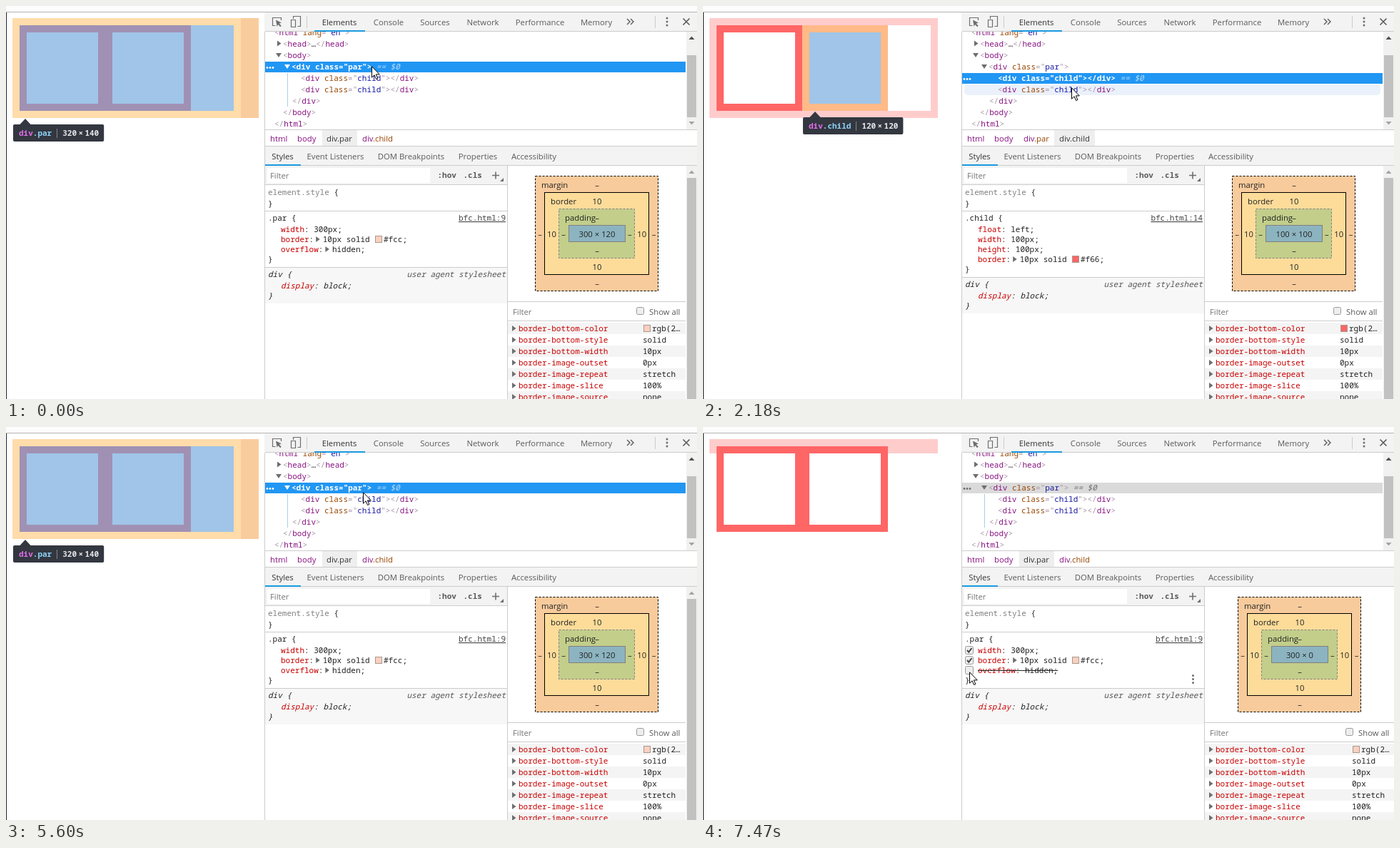
An HTML page that plays this animation: 968x551 px, repeating every 8.96 s.

```html
<!DOCTYPE html>
<html lang="en">
<head>
<meta charset="utf-8">
<title>Inspecting a block formatting context</title>
<style>
  html, body { margin: 0; width: 100%; height: 100%; overflow: hidden; background: #fff; }
  svg { display: block; width: 968px; height: 551px; }
  text { white-space: pre; font: 11.3px "Open Sans", "Noto Sans", sans-serif; }
  .mono { font: 11px "Noto Sans Mono", "DejaVu Sans Mono", monospace; }
  .bold { font-weight: 700; }
  .italic { font-style: italic; }
  .mid { text-anchor: middle; }
  .end { text-anchor: end; }
</style>
</head>
<body>
<svg id="stage" viewBox="0 0 968 551"></svg>
<script>
const LOOP = 8960, CHAR = 6.6;
const TAG = '#881280', ATTR = '#994500', VALUE = '#1a1aa6', PUNCT = '#a894a6';
const PROP = '#c80000', INK = '#222', GRAY = '#6e6e6e', LINE = '#ccc', BAR = '#f3f3f3', BLUE = '#2196f3';
const CONTENT = 'rgba(111,168,220,.66)', BORDER = 'rgba(255,229,153,.66)', MARGIN = 'rgba(246,178,107,.66)';

// Pointer moves: start, end, number of steps, destination.
const START = [512, 84];
const MOVES = [
  [1000, 1110, 3, 517, 97], [1250, 1250, 1, 517, 98], [1990, 2180, 4, 516, 114],
  [4300, 4480, 4, 506, 98], [4550, 4550, 1, 500, 91], [5650, 5910, 5, 436, 284],
  [6050, 6580, 9, 376, 345], [6720, 6790, 2, 373, 343]
];
const CLICKS = [[560, 680], [1810, 1930], [3170, 3310], [5090, 5220], [7280, 7470]];
const SELECTED = [[0, 0], [1860, 1], [3240, 2], [5150, 0]];
const UNCHECK = 7350;

// ---- drawing helpers
const esc = s => s.replace(/&/g, '&amp;').replace(/</g, '&lt;');
const rect = (x, y, w, h, fill, more = '') =>
  `<rect x="${x}" y="${y}" width="${w}" height="${h}" fill="${fill}" ${more}/>`;
const outline = (x, y, w, h, fill, stroke, more = '') =>
  rect(x + .5, y + .5, w - 1, h - 1, fill, `stroke="${stroke}" ${more}`);
const path = (d, fill, stroke = 'none', width = 1) =>
  `<path d="${d}" fill="${fill}" stroke="${stroke}" stroke-width="${width}"/>`;
const text = (x, y, s, fill = INK, cls = '') =>
  `<text x="${x}" y="${y}" fill="${fill}" class="${cls}">${esc(s)}</text>`;
const spans = (x, y, parts, cls = 'mono') => `<text x="${x}" y="${y}" class="${cls}">` +
  parts.map(([s, fill]) => `<tspan fill="${fill}">${esc(s)}</tspan>`).join('') + '</text>';
const mono = (x, y, s, fill = INK, cls = '') => text(x, y, s, fill, 'mono ' + cls);
const right = (x, y, fill = GRAY) => path(`M${x} ${y - 4}v8l5.5 -4z`, fill);
const down = (x, y, fill = GRAY) => path(`M${x} ${y - 3}h8l-4 6z`, fill);
const dots = (x, y, dx, dy, r, fill) =>
  [-1, 0, 1].map(i => `<circle cx="${x + i * dx}" cy="${y + i * dy}" r="${r}" fill="${fill}"/>`).join('');
const swatch = (x, y, fill) => outline(x, y, 10, 10, fill, '#a9988f');
const checkbox = (x, y, on) => outline(x, y, 12, 12, '#eee', '#999', 'rx="2"') +
  (on ? path(`M${x + 3} ${y + 6}l2.3 2.6l4.2 -5.6`, 'none', '#444', 2) : '');
const hline = (x, y, w) => rect(x, y, w, 1, LINE);

// ---- state
function pointer(t) {
  let [x, y] = START;
  for (const [from, to, steps, endX, endY] of MOVES) {
    if (t < from) break;
    const k = t >= to ? 1 : (1 + Math.floor((t - from) / (to - from) * (steps - 1))) / steps;
    x += (endX - x) * k;
    y += (endY - y) * k;
  }
  return [x, y];
}

function stateAt(t) {
  const [x, y] = pointer(t);
  return {
    x, y,
    row: y >= 78 && y < 174 ? Math.floor((y - 78) / 16) : -1,
    selected: SELECTED.filter(s => s[0] <= t).pop()[1],
    click: CLICKS.some(([a, b]) => t >= a && t < b),
    ruleHover: y >= 284,
    off: t >= UNCHECK
  };
}

// ---- inspected page
function tooltip(x, y, tag, cls, w, h) {
  const sep = x + 15 + CHAR * (tag + cls).length;
  return rect(x, y, sep + 66 - x, 24, '#333740', 'rx="2"') +
    path(`M${x + 9} ${y + .5}l8 -8.5l8 8.5z`, '#333740') +
    spans(x + 8, y + 16, [[tag, '#e36eec'], [cls, '#8ed3fb']], 'mono bold') +
    rect(Math.floor(sep), y + 6, 1, 13, '#80868b') +
    `<text class="mono bold" x="${sep + 8}" y="${y + 16}" fill="#e4e6e8">${w}<tspan dx="2.4">×</tspan><tspan dx="2.4">${h}</tspan></text>`;
}

function frame(x, y, w, h, fill) {
  return path(`M${x} ${y}h${w}v${h}h${-w}zM${x + 10} ${y + 10}v${h - 20}h${w - 20}v${20 - h}z`, fill);
}

function overlay(row) {
  if (row === 0 || row === 3)
    return frame(9, 17, 320, 140, BORDER) + rect(19, 27, 300, 120, CONTENT) +
      rect(329, 17, 25, 140, MARGIN) + tooltip(10, 166, 'div', '.par', 320, 140);
  if (row === 1 || row === 2) {
    const x = 19 + 120 * (row - 1);
    return frame(x, 27, 120, 120, BORDER) + rect(x + 10, 37, 100, 100, CONTENT) +
      tooltip(x + 1, 156, 'div', '.child', 120, 120);
  }
  if (row === 4)
    return path('M1 9h361v156h-361zM9 17v140h345v-140z', MARGIN) + rect(9, 17, 345, 140, CONTENT) +
      tooltip(10, 166, 'body', '', 345, 140);
  if (row === 5)
    return rect(1, 9, 361, 156, CONTENT) + tooltip(2, 174, 'html', '', 361, 156);
  return '';
}

function page(s) {
  const h = s.off ? 20 : 140;
  return rect(0, 0, 968, 8, '#fdfdfd') + rect(0, 8, 968, 1, '#b4b4b4') + rect(0, 9, 1, 542, '#20242c') +
    (s.off ? rect(9, 17, 320, h, '#fcc') : frame(9, 17, 320, h, '#fcc')) +
    [19, 139].map(x => rect(x + 10, 37, 100, 100, '#fff') + frame(x, 27, 120, 120, '#f66')).join('') +
    overlay(s.row);
}

// ---- top toolbar
function toolbar() {
  const tabs = [['Elements', 467], ['Console', 536], ['Sources', 601], ['Network', 668], ['Performance', 748], ['Memory', 827]];
  return rect(362, 9, 606, 27, BAR) + hline(363, 35, 605) +
    path('M385.5 20v-3.5h-12v11h4', 'none', GRAY, 1.2) + path('M378 19.5l8 4l-3.3 1.1l3 3.2l-1.5 1.4l-3 -3.2l-1.5 2.8z', GRAY) +
    path('M402.5 18v-3.5h10v14h-4M399.5 19.5h6v10h-6z', 'none', GRAY, 1.2) +
    rect(421, 14, 1, 17, LINE) + rect(909, 14, 1, 17, LINE) +
    tabs.map(([name, x], i) => text(x, 27, name, i ? '#5a5a5a' : '#333', 'mid')).join('') +
    rect(432, 34, 71, 2, '#1a9ae0') +
    path('M870 18l4 4l-4 4M875 18l4 4l-4 4', 'none', '#5a5a5a', 1.4) +
    dots(926, 22, 0, 5, 1.5, GRAY) + path('M948.5 17.5l9 9M957.5 17.5l-9 9', 'none', '#5a5a5a', 1.6);
}

// ---- element tree
const close = name => [['</', PUNCT], [name, TAG], ['>', PUNCT]];
const open = (name, attr, value) => [['<', PUNCT], [name, TAG],
  ...(attr ? [[' ' + attr, ATTR], ['="', PUNCT], [value, VALUE], ['"', PUNCT]] : []), ['>', PUNCT]];

function tree(s) {
  const child = [...open('div', 'class', 'child'), ...close('div')];
  const rows = [
    [376, open('html', 'lang', 'en')], [388, [...open('head'), ['…', INK], ...close('head')]], [388, open('body')],
    [400, open('div', 'class', 'par')], [413, child], [413, child],
    [401, close('div')], [388, close('body')], [376, close('html')]
  ];
  const focus = !s.off, top = 78 + 16 * s.selected;
  let out = rect(363, 36, 605, 137, '#fff');
  if (s.row >= 0 && s.row !== s.selected) out += rect(366, 78 + 16 * s.row, 583, 15, '#ebf1fb', 'rx="5"');
  out += rect(363, top, 589, 15, focus ? BLUE : '#dadada') + dots(370, top + 8.5, 4, 0, 1.4, focus ? '#fff' : GRAY);
  if (s.selected === 0) out += rect(394, 94, 1, 47, '#a9cdea');
  rows.forEach(([x, parts], i) => {
    const y = 41 + 16 * i, picked = i - 3 === s.selected, white = picked && focus;
    out += spans(x, y, white ? parts.map(p => [p[0], '#fff']) : parts, white ? 'mono bold' : 'mono');
    if (picked) {
      const length = parts.reduce((n, p) => n + p[0].length, 0);
      out += mono(x + CHAR * (length + 1), y, '== $0', white ? '#b9dcf9' : GRAY, 'italic');
    }
  });
  out += right(380, 52.5) + down(378, 69) + down(390, 85, s.selected === 0 && focus ? '#fff' : GRAY);
  out += rect(953, 36, 15, 137, '#f1f1f1') + rect(954, 69, 13, 87, '#c1c1c1') +
    path('M956.5 47h8l-4 -4.5z', '#505050') + path('M956.5 162h8l-4 4.5z', '#a3a3a3');
  return `<g clip-path="url(#treeClip)">${out}</g>`;
}

function crumbs(s) {
  const crumb = (x, cls, picked, left, w) => picked
    ? rect(left, 174, w, 22, '#eee') + text(x, 190, 'div' + cls, '#333')
    : spans(x, 190, [['div', TAG], [cls, ATTR]], '');
  return hline(363, 173, 605) + rect(363, 174, 605, 22, '#fff') +
    text(370, 190, 'html', TAG) + text(408, 190, 'body', TAG) +
    crumb(449, '.par', s.selected === 0, 443, 49) + crumb(499, '.child', s.selected > 0, 492, 57);
}

// ---- styles pane
function declaration(y, name, value, expand, color) {
  const x = 385, after = x + CHAR * (name.length + 1);
  if (!expand) return spans(x, y, [[name, PROP], [': ' + value + ';', INK]]);
  const start = after + 12.5;
  let out = spans(x, y, [[name, PROP], [':', INK]]) + right(after + 3, y - 4) + mono(start, y, value + (color ? '' : ';'));
  if (color) out += swatch(517, y - 9, color) + mono(529, y, (color === '#f66' ? '#f66' : '#fcc') + ';');
  return out;
}

function styles(s) {
  const par = s.selected === 0, shift = par ? 0 : 14, end = 366 + shift;
  const tabs = [['Styles', 387.5], ['Event Listeners', 461.5], ['DOM Breakpoints', 567.5], ['Properties', 661], ['Accessibility', 739.5]];
  let out = rect(363, 196, 605, 28, BAR) + hline(363, 196, 605) + hline(363, 223, 605) +
    tabs.map(([name, x], i) => text(x, 215, name, i ? '#5a5a5a' : '#333', 'mid')).join('') +
    rect(363, 222, 50, 2, '#1a9ae0') +
    rect(363, 224, 339, 27, BAR) + rect(366, 227, 228, 21, '#fff') + text(370, 242, 'Filter', '#757575') +
    mono(604.5, 241, ':hov', '#5a5a5a', 'bold') + mono(640.5, 241, '.cls', '#5a5a5a', 'bold') +
    path('M681 237.5h10M686 232.5v10', 'none', GRAY, 1.6) + path('M697 241v5h-5z', GRAY) + hline(363, 250, 339) +
    spans(367, 265, [['element.style', '#808080'], [' {', INK]]) + mono(367, 281, '}') + hline(363, 287, 339) +
    mono(367, 301, par ? '.par {' : '.child {') +
    `<text class="mono end" x="700" y="301" fill="#444" text-decoration="underline">${par ? 'bfc.html:9' : 'bfc.html:14'}</text>`;
  if (par) {
    out += declaration(317, 'width', '300px') + declaration(331, 'border', '10px solid', true, '#fcd0c0');
    out += s.off
      ? declaration(345, 'overflow', 'hidden') + rect(385, 341, 112, 1, INK)
      : declaration(345, 'overflow', 'hidden', true);
  } else {
    out += declaration(317, 'float', 'left') + declaration(331, 'width', '100px') +
      declaration(345, 'height', '100px') + declaration(359, 'border', '10px solid', true, '#f66');
  }
  out += mono(367, 359 + shift, '}');
  if (s.ruleHover)
    out += [307, 321, 335].map((y, i) => checkbox(367, y, i < 2 || !s.off)).join('') + dots(686.5, 353.5, 0, 5, 1.5, GRAY);
  return out + rect(363, end, 339, 51, '#f7f7f7') + hline(363, end, 339) +
    mono(367, end + 14, 'div {', INK, 'italic') + mono(700, end + 14, 'user agent stylesheet', '#555', 'italic end') +
    spans(385, end + 30, [['display', PROP], [': block;', INK]], 'mono italic') + mono(367, end + 44, '}', INK, 'italic');
}

// ---- box model and computed values
function boxModel(size) {
  const label = (x, y, s) => text(x, y, s, INK, 'mid');
  const dash = 'stroke-dasharray="3 2"';
  return outline(741, 238, 173, 162, '#f8cb9c', '#000', dash) + outline(754, 261, 147, 116, '#fddc9a', '#000') +
    outline(774, 284, 107, 70, '#c2ce8a', '#808080', dash) + outline(788, 307, 80, 24, '#8cb4c0', '#808080') +
    text(750, 255, 'margin') + text(763, 278, 'border') + text(783, 301, 'padding') +
    ['–', '10', '–'].map((s, i) => label(828, 255 + 23 * i, s) + label(828, 393 - 23 * i, s) +
      label(748 + 16.5 * i, 324, s) + label(907.5 - 16.8 * i, 324, s)).join('') +
    label(828, 324, size);
}

function sidebar(s) {
  const par = s.selected === 0, dx = s.off ? 17 : 0, width = s.off ? 265 : 249;
  const values = [
    ['bottom-color', 'rgb(2…'], ['bottom-style', 'solid'], ['bottom-width', '10px'], ['image-outset', '0px'],
    ['image-repeat', 'stretch'], ['image-slice', '100%'], ['image-source', 'none']
  ];
  let out = rect(702, 224, 1, 327, LINE) +
    `<g transform="translate(${s.off ? 8 : 0})">${boxModel(s.off ? '300 × 0' : par ? '300 × 120' : '100 × 100')}</g>` +
    hline(703, 414, width) + text(710, 433, 'Filter', '#757575') +
    outline(883 + dx, 422, 11, 11, '#eee', '#999', 'rx="2"') + text(901 + dx, 433, 'Show all', '#5a5a5a') + hline(703, 441, width);
  values.forEach(([name, value], i) => {
    const y = 456 + 16 * i;
    if (i % 2 === 0) out += rect(703, y - 12, width, 16, '#f4f4f4');
    out += right(709, y - 4) + mono(718, y, 'border-' + name, PROP) + mono((i ? 892 : 905) + dx, y, value);
  });
  out += swatch(893 + dx, 447, par ? '#fcd0c0' : '#f66');
  if (!s.off)
    out += rect(953, 224, 15, 327, '#f1f1f1') + rect(954, 241, 13, 310, '#c1c1c1') + path('M956.5 235h8l-4 -4.5z', '#a3a3a3');
  return out;
}

function cursor(s) {
  const x = Math.round(s.x), y = Math.round(s.y);
  return (s.click ? `<circle cx="${x}" cy="${y}" r="12" fill="#f1f14d" style="mix-blend-mode:multiply"/>` : '') +
    path(`M${x + .5} ${y + .8}v15.4l3.6 -3.4l2.5 5.7l2.3 -1l-2.5 -5.6h4.9z`, '#fff', '#000');
}

const stage = document.getElementById('stage');
const defs = '<defs><clipPath id="treeClip"><rect x="363" y="36" width="605" height="137"/></clipPath></defs>';
let shown = '';

function draw() {
  const state = stateAt(performance.now() % LOOP), key = JSON.stringify(state);
  if (key !== shown) {
    shown = key;
    stage.innerHTML = defs + rect(362, 9, 1, 542, LINE) + toolbar() + tree(state) + crumbs(state) +
      styles(state) + sidebar(state) + page(state) + cursor(state);
  }
  requestAnimationFrame(draw);
}
draw();
</script>
</body>
</html>
```
